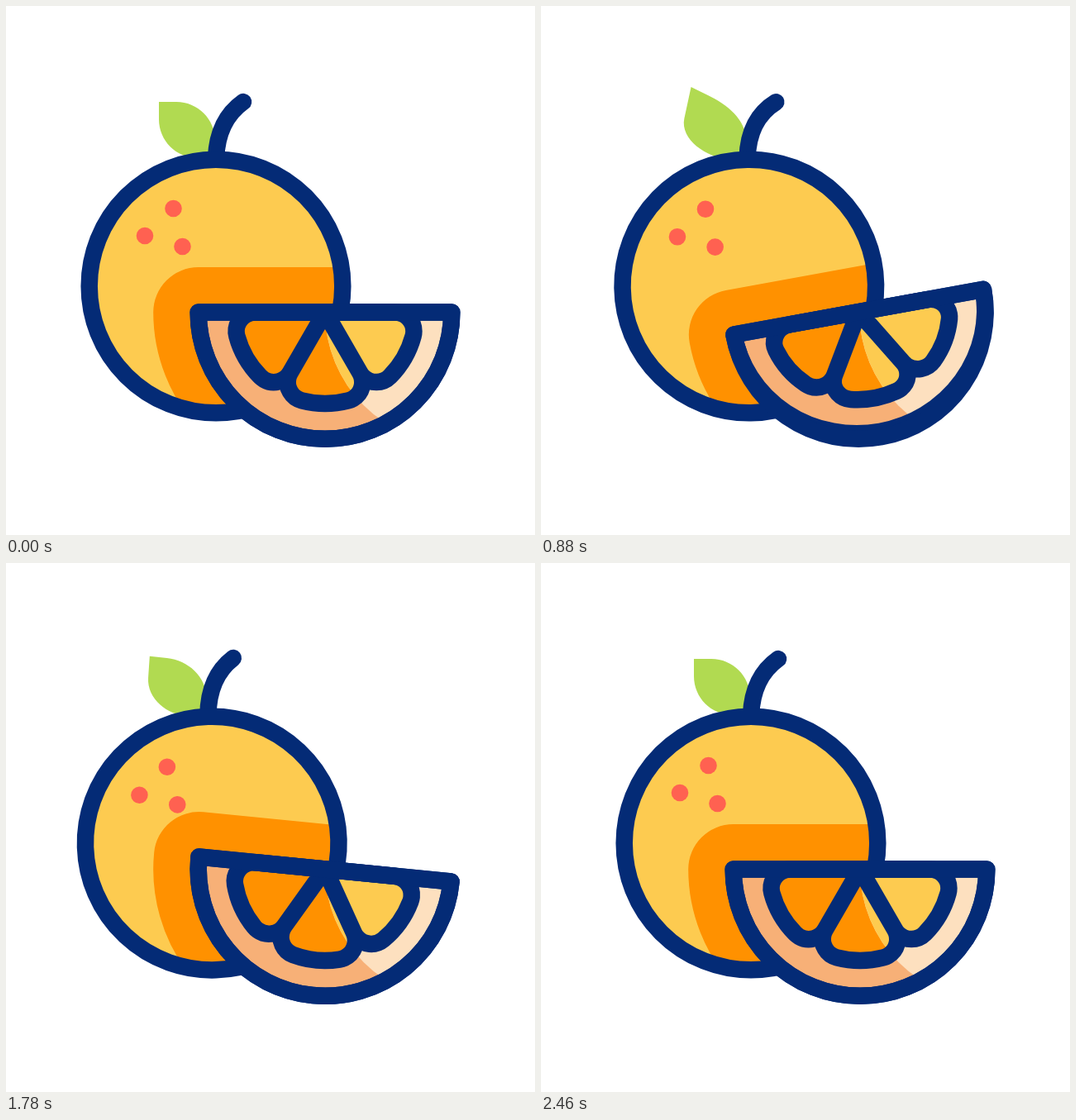
Animation of 640x640 px, one loop 2800 ms. Source, as an HTML page with a canvas:

```html
<!DOCTYPE html>
<html lang="en">
<head>
<meta charset="utf-8">
<title>Orange</title>
<style>
  html, body { margin: 0; width: 100%; height: 100%; overflow: hidden; background: #fff; }
  canvas { display: block; width: 640px; height: 640px; }
</style>
</head>
<body>
<canvas id="stage" width="640" height="640"></canvas>
<script>
const ctx = document.getElementById('stage').getContext('2d');
const LOOP = 2800, LINE = 20.5, RADIUS = 153.3, TAU = Math.PI * 2;
const COLOR = {
  navy: '#042b76', yellow: '#fdcb50', orange: '#ff9100', leaf: '#b1da51',
  dot: '#ff6151', streak: '#6b64f9', peach: '#f7b077', cream: '#fde0bf'
};

// Eased keyframes as [time, value] pairs.
const TILT = [[0, 0], [320, -19], [690, 5.7], [1045, -6], [1505, 6], [1965, -6], [2460, 0]];
const LEAF = [[0, 0], [320, -1], [740, 1.4], [1080, -.4], [1580, .86], [2030, -.68], [2460, 0]];
const STEM = [[0, 0], [320, -16.4], [680, 10], [1030, -2], [1540, 10.5], [2000, -10], [2460, 0]];
const TURN = [[0, 0], [305, -48.3], [990, -7.5], [1560, 6.6], [2460, 0]];
const FOLD = [[0, 0], [305, 1], [1030, 0]];

const rad = deg => deg * Math.PI / 180;

function ease(from, to, t) {
  const p = Math.min(1, Math.max(0, (t - from) / (to - from)));
  return p * p * (3 - 2 * p);
}

function track(keys, t) {
  for (let i = 1; i < keys.length; i++) {
    const [t0, v0] = keys[i - 1], [t1, v1] = keys[i];
    if (t < t1) return v0 + (v1 - v0) * ease(t0, t1, t);
  }
  return keys[keys.length - 1][1];
}

function fill(color, path) {
  ctx.fillStyle = color;
  ctx.fill(path);
}

function stroke(color, path, width = LINE) {
  ctx.strokeStyle = color;
  ctx.lineWidth = width;
  ctx.stroke(path);
}

function disc(x, y, r) {
  const path = new Path2D();
  path.arc(x, y, r, 0, TAU);
  return path;
}

function transformed(path, matrix) {
  const out = new Path2D();
  out.addPath(path, matrix);
  return out;
}

// Lower part of a disc, cut by a level edge that lies `lift` above its centre.
function cutDisc(lift) {
  const extra = Math.asin(lift / RADIUS);
  const path = new Path2D();
  path.arc(0, 0, RADIUS, -extra, Math.PI + extra);
  path.closePath();
  return path;
}

// Sector with its two outer corners rounded.
function segment(start, end) {
  const outer = 110.5, corner = 23, reach = outer - corner;
  const inset = Math.asin(corner / reach);
  const a = start + inset, b = end - inset;
  const path = new Path2D();
  path.moveTo(0, 0);
  path.arc(reach * Math.cos(a), reach * Math.sin(a), corner, start - Math.PI / 2, a);
  path.arc(0, 0, outer, a, b);
  path.arc(reach * Math.cos(b), reach * Math.sin(b), corner, b, end + Math.PI / 2);
  path.closePath();
  return path;
}

const HALF = cutDisc(0);
const SEGMENTS = new Path2D();
for (let i = 0; i < 3; i++) SEGMENTS.addPath(segment(rad(60 * i), rad(60 * i + 60)));

// Point reached by going on past b, coming from a.
function beyond(a, b, distance) {
  const dx = b[0] - a[0], dy = b[1] - a[1], k = distance / Math.hypot(dx, dy);
  return [b[0] + dx * k, b[1] + dy * k];
}

function leafPath(bend) {
  const up = Math.max(0, bend), down = Math.max(0, -bend);
  const at = (x, y, ux, uy, dx, dy) => [x + ux * up + dx * down, y + uy * up + dy * down];
  const tip = at(185, 116, 3, -26, -21, 15);
  const top = at(206, 116, 2, -12, -6, 15);
  const side = at(185, 137, -9, -3, -22, 13);
  const low = at(232, 184, 0, 0, -7, 3);
  const k = 26;
  const path = new Path2D();
  path.moveTo(...tip);
  path.lineTo(...top);
  path.bezierCurveTo(...beyond(tip, top, k), 253, 163 - k, 253, 163);
  path.lineTo(253, 190);
  path.lineTo(...low);
  path.bezierCurveTo(low[0] - k, low[1], ...beyond(tip, side, k), ...side);
  path.closePath();
  return path;
}

function stemPath(bend) {
  const path = new Path2D();
  path.moveTo(254, 184);
  path.quadraticCurveTo(256, 138 - .5 * Math.abs(bend),
    287 + bend, 116 + .3 * bend - .02 * bend * bend);
  return path;
}

function drawFruit(t, slice) {
  const spin = new DOMMatrix().translate(254, 492.5).rotate(track(TILT, t)).translate(-254, -492.5);
  const place = path => transformed(path, spin);
  const body = place(disc(254, 339, RADIUS));

  fill(COLOR.leaf, place(leafPath(track(LEAF, t))));
  stroke(COLOR.navy, place(stemPath(track(STEM, t))));
  fill(COLOR.yellow, body);

  ctx.save();
  ctx.clip(body);
  fill(COLOR.orange, slice);
  stroke(COLOR.orange, slice, 109);
  ctx.restore();

  for (const [x, y] of [[202.5, 245], [168, 278], [213.5, 291]]) {
    fill(COLOR.dot, place(disc(x, y, 10.3)));
  }
  stroke(COLOR.navy, body);
}

function drawSlice(slice, matrix, fold, lift) {
  const squash = matrix.translate(0, -lift).scale(1, 1 - .38 * fold);
  const face = transformed(HALF, squash);
  const pulp = transformed(SEGMENTS, squash);
  const light = disc(546 - 7 * fold, 370, 160);

  fill(COLOR.orange, slice);
  fill(COLOR.peach, face);
  fill(COLOR.orange, pulp);
  ctx.save();
  ctx.clip(light);
  fill(COLOR.cream, face);
  fill(COLOR.yellow, pulp);
  ctx.restore();

  stroke(COLOR.navy, pulp);
  stroke(COLOR.navy, face);
  stroke(COLOR.navy, slice);
}

// A short line that runs leftwards along a shallow parabola.
function drawStreak(t, start, length, lowX, lowY, spread) {
  const head = start - length * ease(120, 360, t);
  const tail = start - length * ease(190, 425, t);
  if (tail - head < 1) return;
  const path = new Path2D();
  for (let i = 0; i <= 12; i++) {
    const x = head + (tail - head) * i / 12;
    path.lineTo(x, lowY - (x - lowX) ** 2 / spread);
  }
  stroke(COLOR.streak, path);
}

function draw(t) {
  const fold = track(FOLD, t), lift = 3 * fold;
  const matrix = new DOMMatrix().translate(386 - 16 * fold, 370.5).rotate(track(TURN, t));
  const slice = transformed(cutDisc(lift), matrix);

  ctx.fillStyle = '#fff';
  ctx.fillRect(0, 0, 640, 640);
  ctx.lineCap = ctx.lineJoin = 'round';
  drawFruit(t, slice);
  drawSlice(slice, matrix, fold, lift);
  drawStreak(t, 543, 200, 362, 261, 750);
  drawStreak(t, 512, 194, 340, 314.5, 1100);
}

const began = performance.now();
function tick() {
  draw((performance.now() - began) % LOOP);
  requestAnimationFrame(tick);
}
tick();
</script>
</body>
</html>
```
